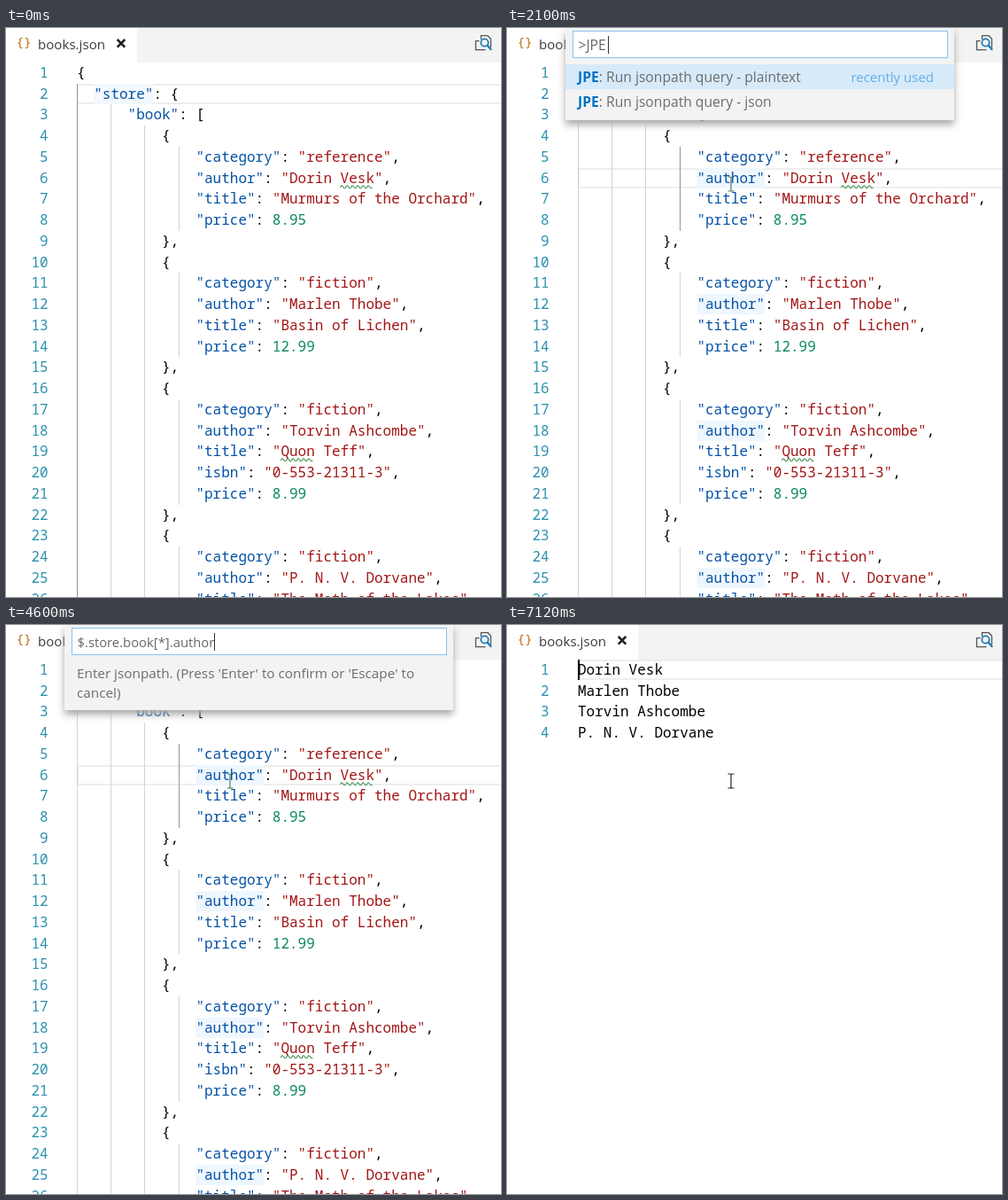
An HTML page for the animation above (8000 ms loop, 559x642 px).

```html
<!DOCTYPE html>
<html lang="en">
<head>
<meta charset="utf-8">
<title>JSON path query</title>
<style>
html, body { margin: 0; width: 559px; height: 642px; overflow: hidden; background: #fff; }
body { position: relative; font-family: "Open Sans", "Noto Sans", sans-serif; }
svg { position: absolute; left: 0; top: 0; display: block; }
.mono { font: 16px "Noto Sans Mono", "DejaVu Sans Mono", monospace; white-space: pre; }
.num { fill: #2b91af; text-anchor: end; }
.key { fill: #0451a5; }
.str { fill: #a31515; }
.val { fill: #09885a; }
.guide { shape-rendering: crispEdges; }
#widget { position: absolute; left: 66px; top: 0; width: 439px; background: #f3f3f3; box-shadow: 0 5px 8px #a8a8a8; }
</style>
</head>
<body>
<svg id="stage" width="559" height="642" viewBox="0 0 559 642">
  <rect width="559" height="642" fill="#fff"/>
  <g id="current"></g>
  <g id="editor"></g>
  <g id="result"></g>
  <rect x="148" width="411" height="39" fill="#f3f3f3"/>
  <g fill="none" stroke="#cb8d45" stroke-width="1.6">
    <path d="M18.5 11.5h-1q-1.6 0-1.6 1.6v2q0 1.8-2.2 1.9q2.2.1 2.2 1.9v2q0 1.6 1.6 1.6h1"/>
    <path d="M21.8 11.5h1q1.6 0 1.6 1.6v2q0 1.8 2.2 1.9q-2.2.1-2.2 1.9v2q0 1.6-1.6 1.6h-1"/>
  </g>
  <text x="36" y="24" font-size="15.1" fill="#3b3b3b">books.json</text>
  <path d="M125.7 13l8.6 8.6M134.3 13l-8.6 8.6" stroke="#222" stroke-width="2.6"/>
  <g fill="none">
    <path d="M536.5 13V8.7h7.5l3.5 3.5V22M534.5 14.7h-4v10h11" stroke="#555" stroke-width="1.3"/>
    <circle cx="540.5" cy="16.5" r="4.2" stroke="#1c7cb4" stroke-width="1.8"/>
    <path d="M543.5 19.5l4.6 5.3" stroke="#1c7cb4" stroke-width="2.4"/>
  </g>
  <rect id="caret" width="2" height="23"/>
  <path id="mouse" d="M-3.5-8h2.2q1.3 0 1.3 1.2q0-1.2 1.3-1.2h2.2M0-7V7M-3.5 8h2.2q1.3 0 1.3-1.2q0 1.2 1.3 1.2h2.2" fill="none" stroke-width="1.2"/>
</svg>
<div id="widget">
  <svg id="panel" width="439" height="104" viewBox="66 0 439 104">
    <rect x="74.5" y="3.5" width="423" height="30" fill="#fff" stroke="#8cc3ea"/>
    <text id="query" x="80.5" y="25" fill="#666"></text>
    <rect id="inputCaret" y="9" width="1" height="20" fill="#333"/>
    <g id="commands" font-size="15.65" fill="#6c6c6c">
      <rect x="66" y="41" width="439" height="28" fill="#d7eafa"/>
      <text x="80" y="61"><tspan font-weight="700" fill="#0072c3">JPE</tspan>: Run jsonpath query - plaintext</text>
      <text x="482" y="61" font-size="15" text-anchor="end" fill="#62b0e4">recently used</text>
      <text x="80" y="89"><tspan font-weight="700" fill="#0072c3">JPE</tspan>: Run jsonpath query - json</text>
    </g>
    <g id="prompt" font-size="15.3" fill="#6c6c6c">
      <text x="80" y="60">Enter jsonpath. (Press 'Enter' to confirm or 'Escape' to</text>
      <text x="80" y="82">cancel)</text>
    </g>
  </svg>
</div>
<script>
const LEFT = 80, CHAR = 9.6, ROW = 23.75, LOOP = 8000;
const $ = id => document.getElementById(id);
const rowTop = line => Math.round(38.9 + (line - 1) * ROW);
const baseline = line => rowTop(line) + 17;
const colX = col => LEFT + col * CHAR;

function add(parent, tag, attrs, text) {
  const el = document.createElementNS("http://www.w3.org/2000/svg", tag);
  for (const k in attrs) el.setAttribute(k, attrs[k]);
  if (text !== undefined) el.textContent = text;
  parent.append(el);
  return el;
}

const books = [
  ["reference", "Dorin Vesk", "Murmurs of the Orchard", "", "8.95"],
  ["fiction", "Marlen Thobe", "Basin of Lichen", "", "12.99"],
  ["fiction", "Torvin Ashcombe", "Quon Teff", "0-553-21311-3", "8.99"],
  ["fiction", "P. N. V. Dorvane", "The Moth of the Lakes"]
];
const fields = ["category", "author", "title", "isbn", "price"];

// Each row is [indent, text].
const rows = [[0, "{"], [2, '"store": {'], [6, '"book": [']];
for (const book of books) {
  rows.push([10, "{"]);
  book.forEach((value, i) => {
    if (!value) return;
    const last = fields[i] === "price";
    rows.push([14, `"${fields[i]}": ` + (last ? value : `"${value}",`)]);
  });
  if (book.length === 5) rows.push([10, "},"]);
}

const editor = $("editor"), result = $("result");
const marks = add(editor, "g", {});
const guides = [];

function drawNumber(parent, n) {
  add(parent, "text", { class: "mono num", x: 47.6, y: baseline(n) }, n);
}

function drawLine(n, indent, text) {
  drawNumber(editor, n);
  const line = add(editor, "text", { class: "mono", x: colX(indent), y: baseline(n) });
  for (const part of text.match(/"[^"]*"|[\d.]+$|[^"\d]+/g)) {
    const isKey = part[0] === '"' && text.startsWith(part + ":");
    const kind = isKey ? "key" : part[0] === '"' ? "str" : /^\d/.test(part) ? "val" : "";
    add(line, "tspan", { class: kind }, part);
  }
}

function squiggle(line, col, chars) {
  let d = `M${colX(col)} ${rowTop(line) + 22}`;
  for (let i = 0; i < chars * CHAR / 6 - 0.5; i++) d += "q1.5-4 3-1t3 1";
  add(editor, "path", { d, fill: "none", stroke: "#3c8c4c", "stroke-width": 1.1 });
}

rows.forEach(([indent, text], i) => {
  const n = i + 1, y = rowTop(n);
  for (let col = 0; col < indent; col += 4) {
    const el = add(editor, "rect", {
      class: "guide", x: Math.floor(colX(col)), y, width: 1, height: rowTop(n + 1) - y
    });
    guides.push({ el, n, col });
  }
  drawLine(n, indent, text);
});
squiggle(6, 31, 4);
squiggle(19, 24, 4);

books.forEach((book, i) => {
  drawNumber(result, i + 1);
  add(result, "text", { class: "mono", x: LEFT, y: baseline(i + 1) }, book[1]);
});

const lineBox = add($("current"), "rect", {
  x: 81, width: 490, height: 21, fill: "none", stroke: "#eee", "stroke-width": 2
});

const author = { line: 6, word: "author", col: 12, mouse: [253, 176], tint: "#e4f0fc" };
const asking = { ...author, tint: "#eff7fe", ink: "#4a7d58" };
const steps = [
  { at: 0, line: 2, word: "store", col: 0, tint: "#f3f8fd" },
  { at: 700, line: 3, word: "book", col: 4, tint: "#e4f0fc", mouse: [237, 145], ink: "#64806e" },
  { at: 1400, ...author, caret: 243 },
  { at: 2100, ...asking, query: ">JPE", size: 15.6, queryEnd: 114, height: 104 },
  { at: 3100, ...asking, query: "$.store.book[*].author", size: 14.8, queryEnd: 235, height: 96 },
  { at: 5600, ...author, caret: 243 },
  { at: 5800, line: 1, caret: 80, mouse: [253, 176], done: true }
];

const show = (el, on) => { el.style.display = on ? "" : "none"; };

function apply(s) {
  show(editor, !s.done);
  show(result, s.done);
  lineBox.setAttribute("y", rowTop(s.line) + 1);

  marks.replaceChildren();
  rows.forEach(([indent, text], i) => {
    if (s.word && text.startsWith(`"${s.word}"`)) {
      add(marks, "rect", {
        x: colX(indent), y: rowTop(i + 1), width: (s.word.length + 2) * CHAR, height: 23, fill: s.tint
      });
    }
  });
  for (const { el, n, col } of guides) {
    const active = col === s.col && (col < 12 || n < 9);
    el.setAttribute("fill", active ? "#939393" : "#d3d3d3");
  }

  show($("caret"), s.caret);
  if (s.caret) {
    $("caret").setAttribute("x", s.caret);
    $("caret").setAttribute("y", rowTop(s.line));
  }
  show($("mouse"), s.mouse);
  if (s.mouse) {
    $("mouse").setAttribute("transform", `translate(${s.mouse})`);
    $("mouse").setAttribute("stroke", s.ink || "#222");
  }

  show($("widget"), s.query);
  if (s.query) {
    $("widget").style.height = s.height + "px";
    $("query").textContent = s.query;
    $("query").setAttribute("font-size", s.size);
    $("inputCaret").setAttribute("x", s.queryEnd);
    show($("commands"), s.query[0] === ">");
    show($("prompt"), s.query[0] === "$");
  }
}

let shown;
const start = performance.now();
function tick() {
  const t = (performance.now() - start) % LOOP;
  const step = steps.findLast(s => s.at <= t);
  if (step !== shown) apply(shown = step);
  requestAnimationFrame(tick);
}
tick();
</script>
</body>
</html>
```
